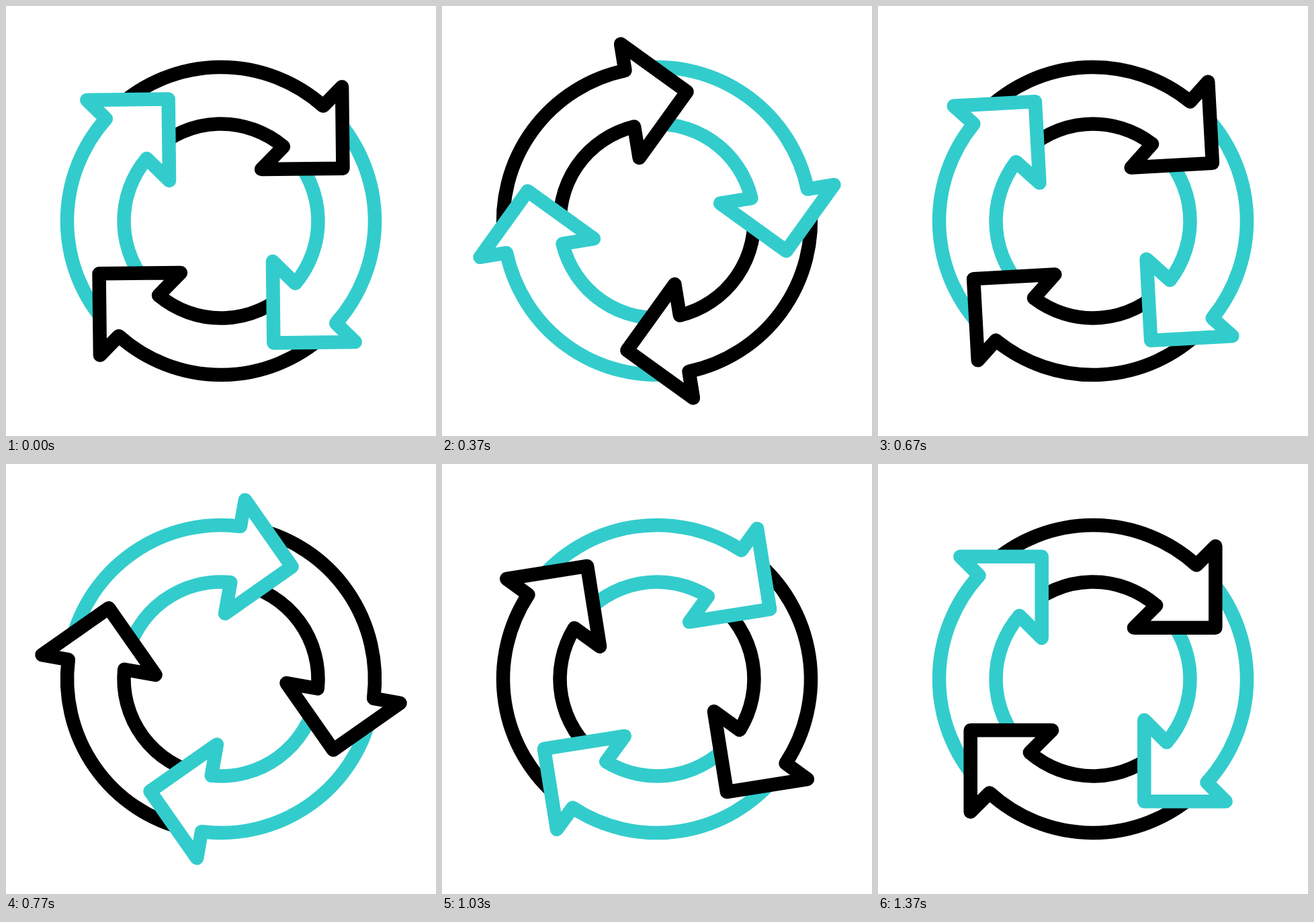
These frames come from a looping animation (640 px wide and 640 px high, 1.67 s). An HTML page with a canvas:

```html
<!DOCTYPE html>
<html lang="en">
<head>
<meta charset="utf-8">
<title>Cycle arrows</title>
<style>
  html, body { margin: 0; width: 100%; height: 100%; overflow: hidden; background: #fff; }
  canvas { display: block; width: 640px; height: 640px; }
</style>
</head>
<body>
<canvas id="stage" width="640" height="640"></canvas>
<script>
const ctx = document.getElementById('stage').getContext('2d');
const COLORS = ['#000000', '#33cccc'];
const LOOP = 1670, LAST_STEP = 41;
const RADII = [229, 144.5];
const TIP = { x: 182.3, y: -76.3 }, LEG = 121.4;
const WING_OUT = { x: TIP.x, y: TIP.y - LEG };
const WING_IN = { x: TIP.x - LEG, y: TIP.y };
const TAIL = 84 * Math.PI / 180;

// Where the arrowhead's back edge crosses each ring
const backDistance = (WING_OUT.x + WING_OUT.y) / Math.SQRT2;
const notchAngles = RADII.map(r => -Math.PI / 4 + Math.asin(backDistance / r));
const notches = RADII.map((r, i) => ({
  x: r * Math.cos(notchAngles[i]),
  y: r * Math.sin(notchAngles[i])
}));

// Ease with horizontal handles at x1 and x2
function ease(x, x1, x2) {
  let lo = 0, hi = 1;
  for (let i = 0; i < 30; i++) {
    const s = (lo + hi) / 2, q = 1 - s;
    if (3 * x1 * s * q * q + 3 * x2 * s * s * q + s * s * s < x) lo = s;
    else hi = s;
  }
  return lo * lo * (3 - 2 * lo);
}

// Wind back, then swing forward a full turn
function angleAt(step) {
  const windUp = 13.6, end = 42, back = -55.9, t = step + 1;
  if (t >= end) return 0;
  if (t < windUp) return back * ease(t / windUp, 0.4, 0.6);
  return back + (360 - back) * ease((t - windUp) / (end - windUp), 0.467, 0.526);
}

function tracePoints(points) {
  ctx.beginPath();
  points.forEach(p => ctx.lineTo(p.x, p.y));
}

function drawBody() {
  RADII.forEach((r, i) => {
    ctx.beginPath();
    ctx.arc(0, 0, r, notchAngles[i] - TAIL, notchAngles[i]);
    ctx.stroke();
  });
}

function drawHead() {
  tracePoints([WING_OUT, TIP, WING_IN]);
  ctx.fill();
  ctx.lineCap = 'round';
  tracePoints([notches[0], WING_OUT, TIP, WING_IN, notches[1]]);
  ctx.stroke();
}

function forEachArrow(degrees, draw) {
  for (let i = 0; i < 4; i++) {
    ctx.save();
    ctx.translate(320, 320);
    ctx.rotate((degrees + i * 90) * Math.PI / 180);
    ctx.strokeStyle = COLORS[i % 2];
    draw();
    ctx.restore();
  }
}

function render() {
  const ms = performance.now() % LOOP;
  // 30 steps a second, on a 10 ms clock
  const step = Math.min(LAST_STEP, Math.floor((Math.floor(ms / 10) + 0.5) * 0.3));
  const degrees = angleAt(step);
  ctx.fillStyle = '#fff';
  ctx.fillRect(0, 0, 640, 640);
  ctx.lineWidth = 20.5;
  ctx.lineJoin = 'round';
  forEachArrow(degrees, drawBody);
  forEachArrow(degrees, drawHead);
  requestAnimationFrame(render);
}

render();
</script>
</body>
</html>
```
